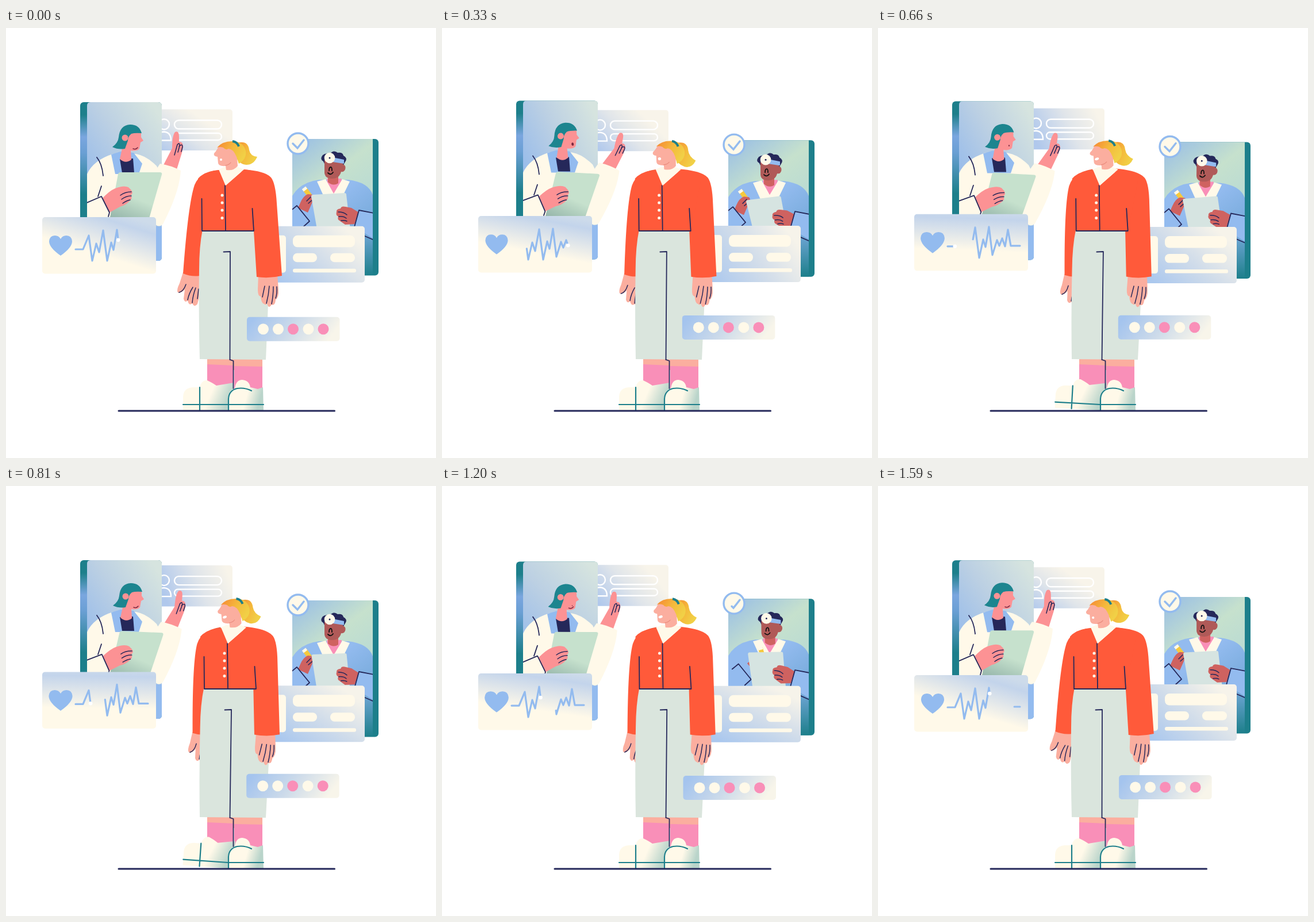
An HTML page that plays this animation: 748 px wide and 748 px high, repeating every 1620 ms.

```html
<!DOCTYPE html>
<html lang="en">
<head>
<meta charset="utf-8">
<title>Online doctors</title>
<style>
html, body { margin: 0; width: 100%; height: 100%; overflow: hidden; background: #fff; }
svg { display: block; width: 100vw; height: 100vh; }
.line { fill: none; stroke: #25285a; stroke-width: 1.8; stroke-linecap: round; stroke-linejoin: round; }
.thin { stroke-width: 1.5; }
.teal { fill: none; stroke: #1d7f8b; stroke-width: 2.2; stroke-linecap: round; }
.cream { fill: #fff9e9; }
.navy { fill: #25285a; }
.blue { fill: #93bbef; }
.red { fill: #ff5a3a; }
.pink { fill: #f98fb8; }
.skin { fill: #fbae9f; }
.rose { fill: #fc9294; }
.brown { fill: #b05a58; }
.palm { fill: #cf6260; }
.white { fill: none; stroke: #fff; stroke-width: 2.4; }
</style>
</head>
<body>
<svg viewBox="0 0 748 748">
<defs>
  <linearGradient id="gId" x1="0" y1=".9" x2=".8" y2=".3">
    <stop offset="0" stop-color="#b0c8ec"/><stop offset=".5" stop-color="#e0e5ea"/><stop offset=".9" stop-color="#f8f4ea"/>
  </linearGradient>
  <linearGradient id="gHeart" x1=".35" y1=".85" x2=".85" y2=".05">
    <stop offset=".25" stop-color="#fff9e9"/><stop offset=".85" stop-color="#c3d4eb"/><stop offset="1" stop-color="#cddbea"/>
  </linearGradient>
  <linearGradient id="gForm" x1=".05" y1=".85" x2=".9" y2=".2">
    <stop offset="0" stop-color="#abc8ee"/><stop offset=".5" stop-color="#d0dcea"/><stop offset="1" stop-color="#f6f3ea"/>
  </linearGradient>
  <linearGradient id="gDots" x1="0" y1=".4" x2="1" y2=".6">
    <stop offset="0" stop-color="#a4c4ee"/><stop offset=".45" stop-color="#cad9ea"/><stop offset=".95" stop-color="#f8f5ea"/>
  </linearGradient>
  <linearGradient id="gBack" x1="0" y1="0" x2="0" y2="1">
    <stop offset=".08" stop-color="#1d7f8b"/><stop offset=".22" stop-color="#7aa6df"/><stop offset=".32" stop-color="#6a9fd4"/><stop offset=".58" stop-color="#1d7f8b"/>
  </linearGradient>
  <linearGradient id="gLeft" x1=".85" y1="0" x2=".2" y2=".75">
    <stop offset="0" stop-color="#d6e4df"/><stop offset=".5" stop-color="#bcd0e3"/><stop offset="1" stop-color="#9abdea"/>
  </linearGradient>
  <linearGradient id="gRight" x1=".1" y1="0" x2=".6" y2=".75">
    <stop offset="0" stop-color="#9bc0e4"/><stop offset=".6" stop-color="#c6e1cd"/><stop offset="1" stop-color="#bcdcd2"/>
  </linearGradient>
  <linearGradient id="gFoot" x1="0" y1="0" x2="0" y2="1">
    <stop offset=".2" stop-color="#6ea5d4"/><stop offset="1" stop-color="#1d7f8b"/>
  </linearGradient>
  <linearGradient id="gBoard" x1=".6" y1=".2" x2=".3" y2="1">
    <stop offset=".35" stop-color="#c6e1cd"/><stop offset="1" stop-color="#8fb0a6"/>
  </linearGradient>
  <linearGradient id="gScrubs" x1="0" y1="0" x2="1" y2="1">
    <stop offset=".4" stop-color="#93bbef"/><stop offset="1" stop-color="#6ea5d4"/>
  </linearGradient>
  <linearGradient id="gHair" x1="0" y1="0" x2="1" y2=".5">
    <stop offset=".05" stop-color="#f68a35"/><stop offset=".55" stop-color="#f4b93c"/><stop offset="1" stop-color="#f1d046"/>
  </linearGradient>
  <linearGradient id="gSleeve" x1="0" y1="0" x2="1" y2=".1">
    <stop offset=".62" stop-color="#ff5a3a"/><stop offset="1" stop-color="#e0593c"/>
  </linearGradient>
  <linearGradient id="gShoe" x1="0" y1="0" x2="1" y2=".25">
    <stop offset=".62" stop-color="#fff9e9"/><stop offset="1" stop-color="#b9d4ca"/>
  </linearGradient>
  <clipPath id="leftClip"><path d="M141 129H330V405H141z"/></clipPath>
  <clipPath id="rightClip"><path d="M498 193H638V375H498z"/></clipPath>
</defs>

<g id="idCard">
  <rect x="255" y="141" width="139" height="71.500" rx="5" fill="url(#gId)"/>
  <g class="white">
    <circle cx="275" cy="167" r="9"/>
    <path d="M264 195V190Q265 180 275 180Q287 181 287 195z"/>
    <rect x="293" y="160" width="82" height="15" rx="7.500"/>
    <rect x="293" y="182.500" width="82" height="12" rx="6"/>
  </g>
</g>

<g id="leftScreen">
  <rect x="129" y="129" width="142" height="276" rx="6" fill="url(#gBack)"/>
  <path class="blue" d="M200 300H271V399Q271 405 265 405H200z"/>
  <path d="M147 129H265Q271 129 271 135V345H141V135Q141 129 147 129z" fill="url(#gLeft)"/>
  <g id="forearm">
    <g id="raisedHand">
      <path class="rose" d="M272 242L289 209Q289 187 294 181Q301 178 301 189L301 198Q308 197 308 207L306 217L297 246L285 252z"/>
      <path class="line thin" d="M293 221L298 203Q302 198 302 205L299 216M301 206Q307 200 307 207L305 215"/>
    </g>
    <path class="cream" d="M268 236Q287 239 304 248Q302 285 273 341Q266 348 259 341L240 300L262 245z"/>
  </g>
  <g clip-path="url(#leftClip)">
    <path class="cream" d="M141 254Q152 230 186 219H226Q244 222 262 240L268 252V340H141z"/>
    <path class="blue" d="M183 220L199 215L222 217L237 236L231 254H190z"/>
    <path class="navy" d="M198 228L221 227L223 252H202z"/>
    <path class="line" d="M158 225Q167 236 169 257M160 293L166 275"/>
    <g id="doctorHead">
      <path class="rose" d="M203 190L219 181L235 181L235 190L239 196L234 199L232 210Q228 215 217 213L218 229Q208 237 198 228L203 205z"/>
      <path d="M185 207Q195 200 196 190Q198 169 216 168Q232 168 236 183Q224 182 218 184Q212 189 212 196L207 210Q195 212 185 207z" fill="#1d858f"/>
      <circle class="rose" cx="207" cy="191" r="5.500"/>
      <path class="line thin" id="doctorSmile" d="M221 210Q226 212 229 208" style="stroke:#7b2740"/>
      <ellipse id="doctorMouth" cx="227" cy="206" fill="#7b2740"/>
    </g>
    <g id="leftBoard">
      <path d="M199 251H268Q272 251 271 255L245 345H178L195 254Q196 251 199 251z" fill="url(#gBoard)"/>
      <path class="rose" d="M167 297Q180 283 190 279Q205 273 213 277L218 282Q222 288 217 291Q221 296 215 301Q209 308 198 311L180 321z"/>
      <path class="line thin" d="M199 291Q207 285 218 285M201 298Q209 292 218 292M203 305Q210 300 216 299"/>
      <path class="cream" d="M136 306L166 293L180 321L176 345H136z"/>
      <path class="line" d="M136 306L166 293L180 321L178 328"/>
    </g>
  </g>
</g>

<g id="heartCard">
  <rect x="63" y="329" width="198" height="98.500" rx="5" fill="url(#gHeart)"/>
  <path class="blue" id="heart" d="M95 396Q75 382 75 371Q76 361 85 361Q92 361 95 367Q98 361 105 361Q114 361 115 371Q115 382 95 396z"/>
  <g fill="none" stroke="#93bbef" stroke-width="3.200" stroke-linecap="round" stroke-linejoin="round">
    <path id="pulseNew" d="M121 385H134L144 361L150 405L157 375L162 390L169 352L176 405L183 373L187 386L193 351L199 400L207 374L211 384L216 371L221 385L226 356L231 384H247"/>
    <path id="pulseOld"/>
  </g>
  <circle id="pulseDot" r="3.300" fill="#fff"/>
</g>

<g id="rightScreen">
  <rect x="498" y="193" width="150" height="237.500" rx="6" fill="#1d7f8b"/>
  <path d="M600 340H638V430H600z" fill="url(#gFoot)"/>
  <path d="M504 193H638V350H498V199Q498 193 504 193z" fill="url(#gRight)"/>
  <g clip-path="url(#rightClip)">
    <path d="M498 292Q512 268 545 264H595Q630 268 638 290V368L620 360H498z" fill="url(#gScrubs)"/>
    <path class="pink" d="M558 262H584L576 300H562z"/>
    <path class="cream" d="M541 267L556 263L570 288L585 263L598 267L582 300H556z"/>
    <path class="pink" d="M559 263Q571 270 582 263L570 287z"/>
    <g id="surgeonHead">
      <path class="palm" d="M560 252H578V270Q569 276 560 268z"/>
      <path class="navy" d="M552 232Q545 228 551 221Q556 217 563 219Q570 211 577 217Q586 216 587 222Q595 226 590 233L586 240H556z"/>
      <path class="brown" d="M554 230L586 232V237Q592 239 590 246Q588 251 583 250Q580 262 567 262Q555 262 554 252z"/>
      <path class="blue" d="M568 225L588 229L588 236L568 233z"/>
      <circle class="cream" cx="563" cy="226" r="9.300"/>
      <circle class="navy" cx="563" cy="226" r="1.500"/>
      <path class="line" d="M562 248Q562 242 565 242Q567 242 567 248M560 252Q565 257 569 251" style="stroke:#111"/>
    </g>
    <g id="writer">
      <path d="M519 279L531 295" stroke="#f5c93f" stroke-width="8"/>
      <path d="M518 278L521 282" stroke="#fff9e9" stroke-width="8"/>
      <path class="palm" d="M512 304Q517 292 525 289L534 290Q538 294 534 299L532 305L525 321L508 313z"/>
      <path class="line thin" d="M523 301L530 294M526 305L533 299"/>
    </g>
    <g id="writerSleeve">
      <path class="blue" d="M470 325L506 309L528 336L515 350H470z"/>
      <path class="line" d="M495 318L506 309L528 336L517 346"/>
    </g>
    <g id="rightBoard">
      <path d="M534 290L589 287Q592 287 592 290L599 350H541L531 293Q531 290 534 290z" fill="#d6e4e1"/>
      <path class="palm" d="M575 320Q574 315 582 314Q583 309 591 311L601 313L614 321L608 341L590 342L580 335Q576 333 578 328Q573 325 575 320z"/>
      <path class="line thin" d="M578 320Q588 320 593 325M579 328Q587 327 592 331M583 335Q589 334 593 336"/>
    </g>
    <path class="blue" d="M614 317L645 324V370L605 345z"/>
    <path class="line" d="M640 322L614 317L606 346M622 361L638 368"/>
  </g>
  <circle class="cream" cx="508" cy="201" r="18" stroke="#93bbef" stroke-width="3.400"/>
  <path id="check" d="M499 201L507 209L518 195" pathLength="1" fill="none" stroke="#93bbef" stroke-width="3.400" stroke-linecap="round"/>
</g>

<g id="formCard">
  <rect x="455" y="345" width="169" height="98" rx="5" fill="url(#gForm)"/>
  <g class="cream">
    <rect x="460" y="361" width="27" height="65" rx="5"/>
    <rect x="499" y="361" width="108" height="20.500" rx="8"/>
    <rect x="499" y="392" width="42" height="15.500" rx="7.500"/>
    <rect x="564" y="392" width="43" height="15.500" rx="7.500"/>
    <rect x="499" y="419" width="110" height="6.500" rx="3.200"/>
  </g>
</g>

<path class="skin" d="M350 570H446V595H350z"/>
<path class="pink" d="M350 585L395 587V625H350zM397 588L446 589V630H397z"/>
<g id="leftShoe">
  <path d="M308 665V641Q309 626 325 625H337Q340 612 350 613Q357 616 366 622L396 617V665z" fill="url(#gShoe)"/>
  <path class="teal" d="M337 625V665M308 655H386"/>
</g>
<path d="M386 665V645Q388 629 398 627Q400 612 411 612Q423 613 425 625L438 628L447 625L448 665z" fill="url(#gShoe)"/>
<path class="teal" d="M387 665L387 645Q388 630 402 627Q415 625 427 631M387 655H448"/>
<path class="line" d="M196 666H571.500" style="stroke-width:3"/>

<g id="leftArm">
  <path class="skin" d="M308 425L302 444Q296 456 299 460Q304 462 311 455L309 471Q311 479 316 474Q318 484 324 479Q328 487 333 480L336 468L337 425z"/>
  <path class="line thin" d="M301 460Q309 458 313 446M325 451Q318 462 316 473M330 452Q325 465 324 478M335 454L333 471"/>
  <path d="M371 247Q337 250 328 273Q317 305 308 427Q322 433 337 431L350 353L375 300z" fill="url(#gSleeve)"/>
</g>
<g id="pants">
  <path d="M342 350H431L446 400L456 480L452 577L337 576Q335 500 336 420Q336 380 342 350z" fill="#dae5dd"/>
  <path class="line" d="M378.500 389.500L390 389L389.500 577"/>
</g>
<path class="line" d="M389.500 577L395.500 579V627"/>
<g id="rightArm">
  <path class="skin" d="M439 428L438 455Q438 467 443 467Q444 479 449 480Q452 483 454 479Q457 490 462 481Q468 484 469 473Q475 468 474 455L472 428z"/>
  <path class="line thin" d="M450 449L446 468M458 449Q457 464 453 479M465 450Q465 466 462 480M471 450Q472 462 469 470"/>
  <path class="red" d="M410 246Q450 248 461 260Q469 270 471 305L480 431Q458 436 436 433L431 353L400 300z"/>
</g>
<g id="torso">
  <path class="red" d="M371 247Q345 249 334 262L341 353H431L450 258Q432 247 414 246L382 274z"/>
  <path class="line" d="M340.500 297L341 353H431L428.500 314M381 274L382 352"/>
  <path class="cream" d="M370 246L379 242L402 241L414 246L382 274z"/>
  <g class="cream"><circle cx="376" cy="291" r="2.500"/><circle cx="376" cy="304" r="2.500"/><circle cx="376" cy="317" r="2.500"/><circle cx="376" cy="330.500" r="2.500"/></g>
</g>
<g id="head">
  <path id="ponytail" fill="url(#gHair)"/>
  <path class="skin" d="M370 205Q367 213 362 218Q360 223 368 224L369 235Q370 241 382 240L383 247Q396 249 403 240L401 208z"/>
  <path d="M367 208Q377 196 396 197Q413 198 417 214Q419 228 405 236L401 224Q395 210 387 210Q382 213 378 208Q372 206 367 208z" fill="url(#gHair)"/>
  <circle class="skin" cx="393" cy="223" r="5"/>
  <path d="M394 197Q402 198 405 206" fill="none" stroke="#1d7f8b" stroke-width="4"/>
  <path class="line" d="M382 239Q388 238 391 234" style="stroke:#e98b7d;stroke-width:1.200"/>
  <ellipse id="smile" cx="374" cy="229" fill="#fff"/>
</g>

<g id="dotsCard">
  <rect x="419" y="503" width="161.500" height="42" rx="5" fill="url(#gDots)"/>
  <g class="cream"><circle cx="447.500" cy="524" r="9.500"/><circle cx="473.500" cy="524" r="9.500"/><circle cx="526" cy="524" r="9.500"/></g>
  <g class="pink"><circle cx="499.500" cy="524" r="9.500"/><circle cx="552" cy="524" r="9.500"/></g>
</g>
</svg>

<script>
const LOOP = 1620, STEP = 30;
const KEYS = [0, 330, 510, 810, 1050, 1380];
const $ = id => document.getElementById(id);
const set = (id, attrs) => { for (const name in attrs) $(id).setAttribute(name, attrs[name]); };
const move = (id, transform) => set(id, { transform });
const clamp = x => Math.max(0, Math.min(1, x));

// Smooth cyclic curve through one value per key time.
function curve(t, values) {
  const n = KEYS.length;
  const time = i => KEYS[(i + n) % n] + LOOP * Math.floor(i / n);
  const value = i => values[(i + n) % n];
  const slope = i => (value(i + 1) - value(i - 1)) / (time(i + 1) - time(i - 1));
  let i = n - 1;
  while (KEYS[i] > t) i--;
  const span = time(i + 1) - time(i), u = (t - time(i)) / span, v = 1 - u;
  return v * v * ((1 + 2 * u) * value(i) + u * span * slope(i))
       + u * u * ((3 - 2 * u) * value(i + 1) - v * span * slope(i + 1));
}

// Straight pieces through [time, value] pairs.
function ramp(t, points) {
  const i = Math.max(1, points.findIndex(p => p[0] >= t));
  const [a, x] = points[i - 1], [b, y] = points[i];
  return x + (y - x) * clamp((t - a) / (b - a));
}

const pulse = $('pulseNew'), pulseLength = pulse.getTotalLength();
set('pulseOld', { d: pulse.getAttribute('d') });

function drawRange(id, from, to) {
  const length = Math.max(0, to - from);
  set(id, {
    'stroke-dasharray': `${length} 2000`,
    'stroke-dashoffset': -from,
    visibility: length > 0.01 ? 'visible' : 'hidden'
  });
}

function drawPulse(t) {
  const tail = ramp(t, [[0, 0], [330, 64], [510, 101], [810, 194], [1050, 290], [1380, 415], [LOOP, pulseLength]]);
  const restart = 621, wrapped = t >= restart;
  const head = wrapped
    ? ramp(t, [[restart, 0], [810, 62], [1050, 140], [1380, 245], [LOOP, 324]])
    : ramp(t, [[0, 322], [330, 415], [510, 466], [600, pulseLength], [restart, pulseLength]]);
  drawRange('pulseNew', wrapped ? 0 : tail, head);
  drawRange('pulseOld', wrapped ? tail : pulseLength, pulseLength);
  const { x, y } = pulse.getPointAtLength(head);
  set('pulseDot', { cx: x, cy: y });
}

function render(t) {
  const wave = (size, peak) => size * Math.cos(2 * Math.PI * (t - peak) / LOOP);
  const key = (...values) => curve(t, values);
  const swell = (1 - wave(1, 0)) / 2;

  // Floating cards
  move('idCard', `translate(0 ${wave(3, 250) - 1.2})`);
  move('leftScreen', `translate(0 ${wave(2.6, 1215)})`);
  move('heartCard', `translate(0 ${wave(2.8, 0) - 2.8})`);
  move('rightScreen', `translate(0 ${3 - wave(3, 0)})`);
  move('formCard', `translate(0 ${wave(2, 1050) + 1})`);
  move('dotsCard', `translate(${wave(1, 1320) - .4} ${wave(2.5, 1320) - 1.2})`);
  set('gHeart', { gradientTransform: `rotate(${-30 * swell} .5 .5)` });
  set('gId', { gradientTransform: `translate(${.25 * swell}) rotate(${25 * swell} .5 .5)` });
  set('gForm', { gradientTransform: `rotate(${wave(15, 300)} .5 .5)` });
  set('gLeft', { gradientTransform: `rotate(${wave(10, 400)} .5 .5)` });

  // Left doctor
  move('doctorHead', `translate(${key(0, 1.5, 2, 1, 0, 0)} ${key(0, -.5, 0, 1, 0, 0)}) rotate(${key(0, -3, -3, 0, 0, -2)} 208 230)`);
  const talk = clamp(key(0, 1, 1, 0, 0, .6));
  set('doctorMouth', { ry: 2.8 * talk, rx: 2 * talk });
  set('doctorSmile', { opacity: talk > .4 ? 0 : 1 });
  move('leftBoard', `rotate(${key(0, 3, 4, 2.5, .5, .3)} 170 310)`);
  move('forearm', `rotate(${key(0, 3, 3.6, 1, .3, .7)} 255 335)`);
  move('raisedHand', `rotate(${key(0, 7, 8, 3.5, 1, 3)} 286 242)`);

  // Heart card
  move('heart', `translate(95 378) scale(${key(1, .98, 1.05, 1.03, 1.03, 1.05)}) translate(-95 -378)`);
  drawPulse(t);

  // Right doctor
  move('surgeonHead', `translate(${key(0, 0, 0, 0, 1.5, 1.5)} ${key(0, 1, 0, 0, 1, 1)}) rotate(${key(0, 0, 1, 0, -1, 0)} 570 262)`);
  move('rightBoard', `rotate(${key(0, -4, -4, 1, 2.5, 1)} 592 325) translate(0 ${key(0, 3, 2, -2, -2, -1)})`);
  const reach = ramp(t, [[0, 0], [810, 0], [1050, 1], [1380, .75], [1560, 0], [LOOP, 0]]);
  move('writer', `translate(${30 * reach} ${key(0, 2, 1, 0, 1, -2)}) rotate(${25 * reach} 524 300)`);
  move('writerSleeve', `translate(${11 * reach} ${-3 * reach})`);
  const erased = clamp((t - 1140) / 245), drawn = clamp((t - 1400) / 150);
  if (t < 1400) drawRange('check', Math.min(erased, .98), 1);
  else drawRange('check', 0, drawn);

  // Patient
  const sway = key(0, .42, .78, 1, .9, .25);
  const lean = key(0, .55, .93, 1, .95, .7);
  move('leftArm', `translate(${3.5 * lean}) rotate(${-4.5 * lean} 350 262)`);
  move('rightArm', `translate(${3 * sway}) rotate(${2.4 * lean} 445 265)`);
  move('torso', `translate(${4 * sway})`);
  move('pants', `translate(0 577) skewX(${-.62 * sway}) translate(0 -577)`);
  move('head', `translate(${6.5 * lean} ${-lean}) rotate(${key(0, 3, 2, 0, 0, 3)} 392 245)`);
  const lag = key(0, 5, 4, 4, 4, 5);
  set('ponytail', { d: `M402 200Q421 195 423 212Q425 223 437 ${224 + lag}Q431 ${238 + lag} 418 ${238 + lag / 2}Q405 237 399 222z` });
  set('smile', {
    rx: key(2, 2.7, 3.6, 3.6, 3.6, 3.6), ry: key(2, 2.6, 2.2, 2.2, 2.2, 2.4),
    transform: `rotate(${-22 * lean} 374 229)`
  });
  const lift = ramp(t, [[0, 0], [540, 0], [690, 4], [840, 4], [1050, 1.8], [1170, 0], [LOOP, 0]]);
  move('leftShoe', `rotate(${lift} 386 656)`);
}

function frame() {
  render(Math.floor(performance.now() % LOOP / STEP) * STEP);
  requestAnimationFrame(frame);
}
frame();
</script>
</body>
</html>
```
